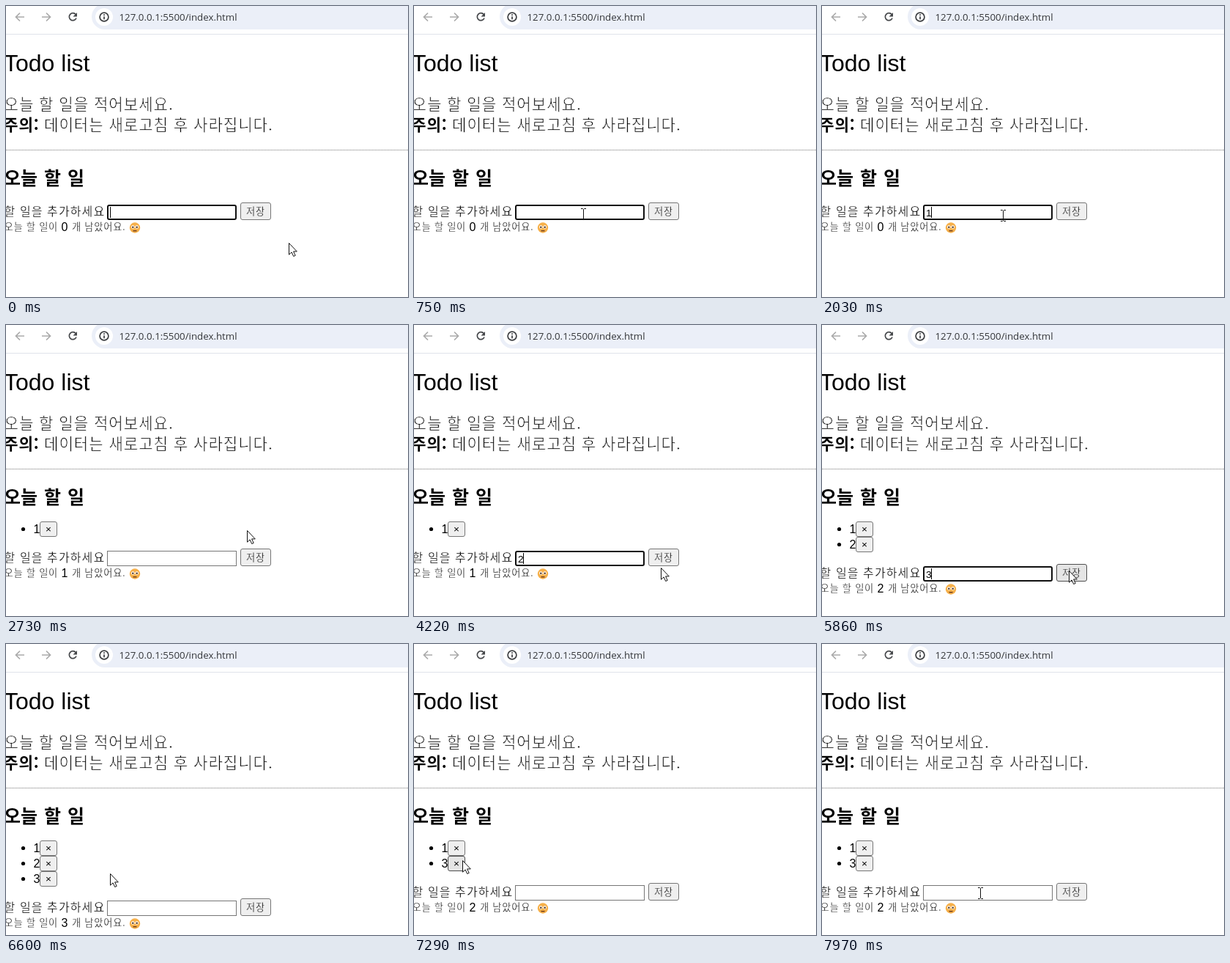
Animation, 549 px wide and 397 px high, one loop 8 s. Source, as an HTML page:

```html
<!DOCTYPE html>
<html lang="ko">
<head>
<meta charset="utf-8">
<title>Todo list</title>
<style>
html, body { margin: 0; width: 100%; height: 100%; overflow: hidden; background: #fff; }
svg { display: block; width: 549px; height: 397px; }
text { font-family: "Noto Sans CJK KR", "Noto Sans CJK", sans-serif; white-space: pre; }
.arial { font-family: "Liberation Sans", Arial, sans-serif; }
.url { font: 13.3px "Open Sans", "Noto Sans", sans-serif; fill: #35373a; }
/* a background-coloured stroke thins the glyphs */
.lead { font-size: 21.2px; letter-spacing: .9px; stroke: #fff; stroke-width: .7; }
.lead .strong { font-weight: 700; stroke: none; }
.h2 { font-size: 25px; font-weight: 700; word-spacing: 2px; }
.label { font-size: 16px; letter-spacing: 1.1px; stroke: #fff; stroke-width: .3; }
.small { font-size: 13.3px; letter-spacing: .7px; stroke: #fff; stroke-width: .35; }
.save { font-size: 13.3px; letter-spacing: .7px; stroke: #efefef; stroke-width: .35; }
.field { font-size: 13.6px; }
.item { font-size: 16px; }
.btn { fill: #efefef; stroke: #767676; }
.btn.hover { fill: #e5e5e5; stroke: #4f4f4f; }
.btn.press { fill: #f5f5f5; stroke: #8d8d8d; }
.line { fill: none; stroke-width: 1.7; }
</style>
</head>
<body>
<svg viewBox="0 0 549 397">
  <!-- browser bar -->
  <rect x="117" y="-3" width="460" height="35" rx="17.5" fill="#ebeff8"/>
  <rect y="38" width="549" height="1" fill="#e0e3ea"/>
  <g class="line" stroke="#ababab">
    <path d="M25 15H14M19 9.5L13.5 15L19 20.5"/>
    <path d="M49 15H60M55 9.5L60.5 15L55 20.5"/>
  </g>
  <path class="line" stroke="#46484b" d="M95.3 11.6A5 5 0 1 0 96 16.5"/>
  <path fill="#46484b" d="M97 9v5.500h-5.500z"/>
  <circle cx="134" cy="15" r="12" fill="#fff"/>
  <circle cx="134" cy="15" r="5.9" class="line" stroke="#3c3e41"/>
  <path d="M134 14.2v4M134 11.2v1.7" class="line" stroke="#3c3e41"/>
  <text class="url" x="154.5" y="20">127.0.0.1:5500/index.html</text>

  <!-- page -->
  <text class="arial" x="-3" y="89" font-size="32">Todo list</text>
  <g class="lead">
    <text x="-2.5" y="141.5">오늘 할 일을 적어보세요.</text>
    <text x="-3" y="169.5" class="strong">주의:</text>
    <text x="52" y="169.5">데이터는 새로고침 후 사라집니다.</text>
  </g>
  <path d="M0 196.5H549" stroke="#777" stroke-dasharray="1 1"/>
  <text class="h2" x="-3" y="243.5">오늘 할 일</text>
  <g id="list"></g>
  <g id="form">
    <text class="label" x="-2.5" y="285.5">할 일을 추가하세요</text>
    <rect id="box" fill="#fff"/>
    <text id="value" class="arial field" x="142" y="286.5"></text>
    <rect id="caret" y="274" width="1" height="15"/>
    <rect id="save" class="btn" x="320.5" y="268.5" width="41" height="23" rx="2.5"/>
    <text class="save" x="328" y="285">저장</text>
    <text class="small" x="-2.500" y="306">오늘 할 일이</text>
    <text id="count" class="arial item" x="75.5" y="307"></text>
    <text class="small" x="90" y="306">개 남았어요.</text>
    <g transform="translate(176 302.5)">
      <circle r="7.2" fill="#f6b04a"/>
      <g fill="#fff"><circle cx="-2.7" cy="-1" r="2.3"/><circle cx="2.7" cy="-1" r="2.3"/></g>
      <g fill="#51331c"><circle cx="-2.7" cy="-.8" r="1.2"/><circle cx="2.7" cy="-.8" r="1.2"/></g>
      <path d="M-2.500 4.200H2.500" stroke="#6b3a1c" stroke-width="1.4"/>
    </g>
  </g>
  <path id="arrow" d="M.5.5V16.2L4.1 12.9L6.7 18.500L9.200 17.400L6.600 11.900H11.300Z" fill="#fff" stroke="#111"/>
  <path id="beam" d="M-3.5-7.5H-1L0-6.5L1-7.5H3.5M0-6.5V6.5M-3.5 7.5H-1L0 6.5L1 7.5H3.5" fill="none" stroke="#111"/>
</svg>
<script>
const $ = id => document.getElementById(id);
const LOOP = 8000;

// time, pointer x, pointer y
const path = [
  [0, 387, 323], [40, 387, 323], [540, 236, 281], [640, 236, 281],
  [880, 225, 288], [1990, 225, 288], [2030, 247, 286], [2270, 336, 282],
  [2400, 330, 280], [2820, 330, 280], [3060, 342, 306], [3480, 285, 319],
  [3920, 285, 319], [4220, 338, 331], [4360, 340, 322], [4700, 352, 323],
  [4970, 342, 322], [5080, 342, 322], [5190, 290, 338], [5420, 290, 338],
  [5660, 338, 335], [6080, 338, 335], [6600, 143, 313], [6640, 143, 313],
  [7090, 67, 295], [7520, 67, 295], [7970, 216, 340], [LOOP, 216, 340]
];

// time, todo items, typed text, input focused, button pressed
const states = [
  [-220, '', '', 1, 0], [1550, '', '1', 1, 0],
  [2440, '', '1', 0, 1], [2540, '1', '', 0, 0],
  [3360, '1', '', 1, 0], [3760, '1', '2', 1, 0],
  [4430, '1', '2', 0, 1], [4540, '12', '', 0, 0],
  [5190, '12', '', 1, 0], [5390, '12', '3', 1, 0],
  [5930, '12', '3', 0, 1], [6060, '123', '', 0, 0],
  [7290, '13', '', 0, 0]
];

const rowY = i => 268 + 21 * i;
$('list').innerHTML = [0, 1, 2].map(i => `<g transform="translate(0 ${rowY(i)})">
  <circle cx="23.5" cy="10.5" r="2.6"/>
  <text class="arial item" x="37.5" y="16"></text>
  <rect class="btn" x="46.5" y=".5" width="23" height="20" rx="2.5"/>
  <text class="arial field" x="58" y="15" text-anchor="middle">×</text></g>`).join('');
const rows = [...$('list').children];

const show = (el, on) => el.setAttribute('visibility', on ? 'visible' : 'hidden');
const set = (el, attrs) => { for (const k in attrs) el.setAttribute(k, attrs[k]); };
const inside = ([x, y], l, t, w, h) => x >= l && x < l + w && y >= t && y < t + h;

function pointerAt(t) {
  const i = path.findIndex(k => k[0] > t);
  const [t0, x0, y0] = path[i - 1], [t1, x1, y1] = path[i];
  const u = (t - t0) / (t1 - t0), e = u * u * (3 - 2 * u);
  return [x0 + (x1 - x0) * e, y0 + (y1 - y0) * e].map(Math.round);
}

function draw(t) {
  const [since, items, text, focus, press] = states.filter(s => s[0] <= t).pop();
  const p = pointerAt(t), n = items.length, dy = n ? 16 + 21 * n : 0;

  rows.forEach((row, i) => {
    show(row, i < n);
    row.children[1].textContent = items[i] || '';
    row.children[2].classList.toggle('hover', inside(p, 46, rowY(i), 24, 21));
  });

  set($('form'), { transform: `translate(0 ${dy})` });
  set($('box'), focus
    ? { x: 139, y: 272, width: 175, height: 19, rx: 2, stroke: '#101010', 'stroke-width': 2 }
    : { x: 138.5, y: 271.5, width: 176, height: 20, rx: 0, stroke: '#767676', 'stroke-width': 1 });
  $('value').textContent = text;
  set($('caret'), { x: text ? 149 : 142 });
  show($('caret'), focus && (t - since) % 1000 < 500);
  $('count').textContent = n;

  const over = inside(p, 320, 268 + dy, 42, 24);
  $('save').classList.toggle('hover', over && !press);
  $('save').classList.toggle('press', over && !!press);

  const typing = inside(p, 138, 271 + dy, 177, 21);
  show($('beam'), typing);
  show($('arrow'), !typing);
  set($('arrow'), { transform: `translate(${p[0] - 1} ${p[1]})` });
  set($('beam'), { transform: `translate(${p[0] + 0.5} ${p[1]})` });
}

function tick() {
  draw(performance.now() % LOOP);
  requestAnimationFrame(tick);
}
tick();
</script>
</body>
</html>
```
